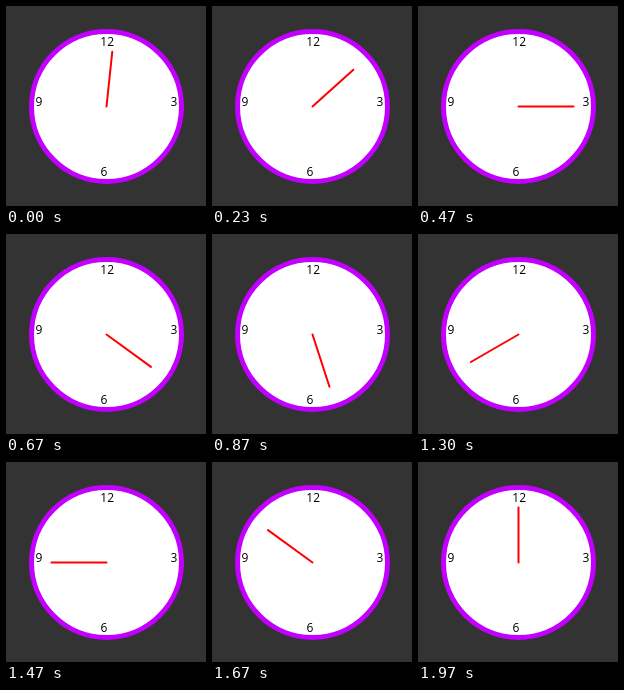
An HTML page that plays this animation: 200 px wide and 200 px high, repeating every 2.01 s.

```html
<!DOCTYPE html>
<html lang="en">
<head>
<meta charset="utf-8">
<title>Clock</title>
<style>
  html, body { margin: 0; height: 100%; overflow: hidden; background: #333; }
  svg { display: block; width: 200px; height: 200px; }
  text { font: 12px "Open Sans", "Noto Sans", sans-serif; }
</style>
</head>
<body>
<svg viewBox="0 0 200 200">
  <circle cx="100.5" cy="100.5" r="75" fill="#fff" stroke="#c300ff" stroke-width="5"/>
  <text x="94.3" y="40">12</text>
  <text x="164.5" y="100">3</text>
  <text x="94.5" y="170">6</text>
  <text x="29.5" y="100">9</text>
  <line id="hand" x1="100.5" y1="100.5" x2="100.5" y2="45.5" stroke="#f00" stroke-width="2" stroke-linecap="round"/>
</svg>
<script>
  const LOOP = 2010, STEPS = 60;
  const hand = document.getElementById("hand");
  const start = performance.now();

  function draw() {
    // 30 steps per second, with step times rounded to 10 ms
    const ticks = Math.floor((performance.now() - start) % LOOP / 10);
    const step = Math.min(STEPS - 1, Math.floor((ticks * 3 + 1) / 10));
    hand.setAttribute("transform", `rotate(${(step + 1) * 360 / STEPS} 100.5 100.5)`);
    requestAnimationFrame(draw);
  }
  draw();
</script>
</body>
</html>
```
